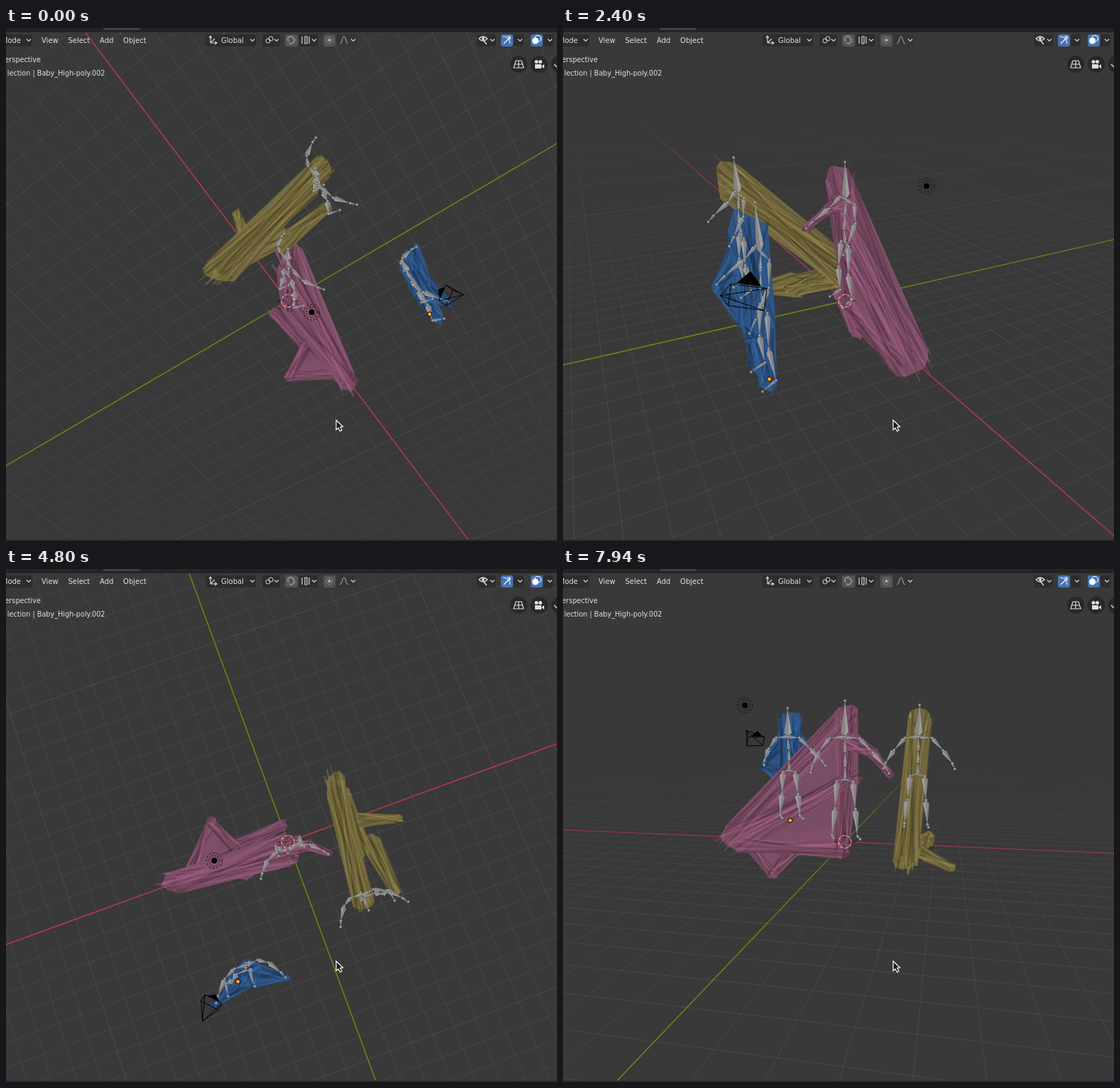
Animation, 776 px wide and 722 px high, one loop 8000 ms. Source, as an HTML page with a canvas:

```html
<!DOCTYPE html>
<html lang="en">
<head>
<meta charset="utf-8">
<title>Viewport orbit</title>
<style>
html, body { margin: 0; width: 100%; height: 100%; overflow: hidden; background: #393939; }
canvas { display: block; }
</style>
</head>
<body>
<canvas id="stage" width="776" height="722"></canvas>
<script>
const ctx = document.getElementById('stage').getContext('2d');
const CX = 397, CY = 384, FOCAL = 690, DIST = 22, NEAR = 0.8, RAD = Math.PI / 180;
const clamp = (v, a = 0, b = 1) => Math.max(a, Math.min(b, v));
const mix = (a, b, k) => a.map((v, i) => v + (b[i] - v) * k);
const add = (a, b, k = 1) => a.map((v, i) => v + b[i] * k);

let seed = 7;
const rand = () => (seed = (seed * 16807) % 2147483647) / 2147483647;

// Orbit keys: time, yaw, pitch (degrees), joined by smooth curves
const orbit = [
  [0, -56.4, -61.6], [1200, -66.5, 29.7], [1800, -2.9, 43], [3150, 133.5, -5.2],
  [4800, 200.1, -96], [6000, 254.5, 10.9], [7940, 191.4, 12.2]
];
function pose(t) {
  let i = 0;
  while (i < orbit.length - 2 && t >= orbit[i + 1][0]) i++;
  const a = orbit[i], b = orbit[i + 1], span = b[0] - a[0], u = clamp((t - a[0]) / span);
  const slope = (k, c) => {
    const p = orbit[Math.max(k - 1, 0)], n = orbit[Math.min(k + 1, orbit.length - 1)];
    return (n[c] - p[c]) / (n[0] - p[0]) * span;
  };
  return [1, 2].map(c => {
    const d = b[c] - a[c], m = slope(i, c), n = slope(i + 1, c);
    return (a[c] + u * (m + u * (3 * d - 2 * m - n + u * (m + n - 2 * d)))) * RAD;
  });
}

let sa, ca, sp, cp;
function setView([yaw, pitch]) {
  sa = Math.sin(yaw); ca = Math.cos(yaw); sp = Math.sin(pitch); cp = Math.cos(pitch);
}
function toView([x, y, z]) {
  const h = y * ca - x * sa;
  return [x * ca + y * sa, h * sp + z * cp, DIST + h * cp - z * sp];
}
const toScreen = ([x, y, d]) => [CX + FOCAL * x / d, CY - FOCAL * y / d];
const project = p => toScreen(toView(p));

function path(points, close) {
  ctx.beginPath();
  points.forEach(p => ctx.lineTo(p[0], p[1]));
  if (close) ctx.closePath();
}
function line(points, color, width = 1) {
  path(points);
  ctx.strokeStyle = color; ctx.lineWidth = width; ctx.stroke();
}
function poly(points, color) {
  path(points, true);
  ctx.fillStyle = color; ctx.fill();
}
function disc(x, y, r, color) {
  ctx.beginPath(); ctx.arc(x, y, r, 0, 7);
  ctx.fillStyle = color; ctx.fill();
}
function ring(x, y, r, color, width = 1, dash = []) {
  ctx.beginPath(); ctx.arc(x, y, r, 0, 7);
  ctx.strokeStyle = color; ctx.lineWidth = width;
  ctx.setLineDash(dash); ctx.stroke(); ctx.setLineDash([]);
}

// Floor grid, fading with distance and at flat angles
function floorLine(at, alongX, range, rgb, strength, reach, width = 1) {
  const point = s => toView(alongX ? [s, at, 0] : [at, s, 0]);
  for (let s = -range; s < range; s += 5) {
    let a = point(s), b = point(s + 5);
    if (a[2] < NEAR && b[2] < NEAR) continue;
    if (a[2] < NEAR) a = mix(b, a, (b[2] - NEAR) / (b[2] - a[2]));
    if (b[2] < NEAR) b = mix(a, b, (a[2] - NEAR) / (a[2] - b[2]));
    const d = Math.hypot(...mix(a, b, 0.5));
    const tilt = clamp(Math.abs(DIST * sp) / d);
    const alpha = strength * (1 - (1 - tilt) ** 4) * clamp((reach - d) / reach * 1.8);
    if (alpha > 0.004) line([toScreen(a), toScreen(b)], `rgba(${rgb},${alpha})`, width);
  }
}
function drawFloor() {
  const flat = Math.abs(sp);
  const minor = 0.08 * clamp((flat - 0.09) * 10), axis = 1.1 * clamp((flat - 0.09) * 10);
  for (const alongX of [true, false]) {
    if (minor) for (let i = -30; i <= 30; i++) if (i % 10) floorLine(i, alongX, 30, '255,255,255', minor, 46);
    for (let i = -100; i <= 100; i += 10) if (i) floorLine(i, alongX, 100, '255,255,255', 0.09, 90);
  }
  if (axis) {
    floorLine(0, true, 100, '188,56,80', axis, 100, 1.4);
    floorLine(0, false, 100, '100,146,10', axis, 100, 1.4);
  }
}

// Bones of one figure, standing at its own origin
const bones = [];
{
  const pelvis = [0, 0, 2.8], neck = [0, 0.05, 4.6];
  const chain = (...joints) => joints.slice(1).forEach((p, i) => bones.push([joints[i], p]));
  chain(pelvis, [0, -0.05, 3.4], [0, 0, 4], neck, [0, 0, 6.1]);
  for (const s of [-1, 1]) {
    chain(neck, [s * 0.65, 0.1, 4.55], [s * 1.2, -0.15, 3.95], [s * 1.68, -0.75, 3.3], [s * 1.82, -1, 3]);
    chain(pelvis, [s * 0.36, 0, 2.7], [s * 0.46, -0.08, 1.5], [s * 0.58, 0.05, 0.3], [s * 0.62, -0.45, 0.05]);
  }
}
function drawBones(base) {
  for (const [from, to] of bones) {
    const a = project(add(base, from)), b = project(add(base, to));
    const dx = b[0] - a[0], dy = b[1] - a[1], len = Math.hypot(dx, dy) || 1;
    const size = Math.hypot(...add(to, from, -1)) * 3.5;
    const mid = [a[0] + dx * 0.14, a[1] + dy * 0.14];
    const side = k => [mid[0] - dy / len * size * k, mid[1] + dx / len * size * k];
    poly([a, side(1), b, mid], '#9c9c9c');
    poly([a, side(-1), b, mid], '#868686');
    for (const p of [a, b]) { disc(...p, 2, '#5d5d5d'); disc(...p, 1.4, '#a5a5a5'); }
  }
}

// Skins: hulls spanned by balls [x, y, z, radius]; streaks run from ball to ball
const DOTS = 24;
function hull(base, ...balls) {
  const points = balls.map(([x, y, z, r]) => Array.from({ length: DOTS }, () => {
    const up = rand() * 2 - 1, turn = rand() * 6.283, flat = Math.sqrt(1 - up * up), k = r * (0.85 + rand() * 0.3);
    return add(add(base, [x, y, z]), [Math.cos(turn) * flat, Math.sin(turn) * flat, up], k);
  }));
  const pick = n => points[n % balls.length][Math.floor(rand() * DOTS)];
  const streaks = Array.from({ length: 45 * balls.length }, (_, n) => {
    const from = pick(n), to = pick(n + 1);
    return { from, to: mix(from, to, 0.97 + rand() * 0.09), width: 0.8 + rand() * 3,
      tone: rand() < 0.55 ? 0.6 : 1.28, alpha: 0.1 + rand() * 0.3 };
  });
  return { points: points.flat(), streaks };
}

// A body lying on the floor whose head is pulled up to the standing bones
function pulledBody(base, turn, veiled) {
  const c = Math.cos(turn), s = Math.sin(turn);
  const at = (along, side, z, r) => [along * c - side * s, along * s + side * c, z, r];
  const head = [0, -0.3, 5.5, 0.55], chest = [0, -0.35, 4.8, 0.45];
  const end = at(5.5, 0.1, 0.1, 0.45), under = at(5, -0.25, -0.4, 0.42);
  const hand = at(2.8, 1.8, -1.15, 0.2), feet = [-1, 1].map(k => at(0, 0.2 + k * 0.55, 0.05 - k * 0.35, 0.24));
  const parts = feet.map((foot, i) => hull(base, at(2.4, i - 0.5, -0.15, 0.4), foot));
  parts.push(hull(base, at(2.3, 0, -0.2, 0.5), at(4.6, 0, -0.2, 0.55)));
  parts.push(hull(base, at(3.4, 0.5, -0.4, 0.3), hand));
  if (veiled) {
    const elbow = [-1.2, -0.2, 3.9, 0.24];
    parts.push(hull(base, at(4.5, 0.2, -0.3, 0.3), hand, at(2.2, 0.3, -0.3, 0.3)));
    parts.push(hull(base, head, end, [-0.2, 0, 2.8, 0.4], under, [0.1, 0.1, -0.3, 0.3]));
    parts.push(hull(base, [-0.3, 0, 4.4, 0.4], elbow), hull(base, elbow, [-1.9, -1, 2.95, 0.16]));
  } else parts.push(hull(base, head, end, chest, under));
  return parts;
}
function cloakedBody(base) {
  const waist = [0, -0.2, 2.4, 0.6], head = [0, -0.35, 5.4, 0.62], parts = [];
  for (const s of [-1, 1]) {
    parts.push(hull(base, [s * 0.25, -0.2, 2.4, 0.5], [s * 0.54, -0.15, 0.3, 0.32]));
    parts.push(hull(base, [0, -0.25, 4.9, 0.5], [s * 1.9, -1, 2.9, 0.16], waist));
  }
  return [...parts, hull(base, head, waist)];
}
const figure = (base, rgb, build, ...args) => ({ base, rgb, parts: build(base, ...args) });
const figures = [
  figure([0, 0, 0], [128, 79, 105], pulledBody, 0, true),
  figure([-2.94, -3.64, 0], [121, 110, 65], pulledBody, Math.PI / 2, false),
  figure([4.15, -5, 0], [47, 87, 136], cloakedBody)
];
function outline(points) {
  points.sort((a, b) => a[0] - b[0] || a[1] - b[1]);
  const half = list => {
    const out = [];
    for (const p of list) {
      while (out.length > 1) {
        const [a, b] = out.slice(-2);
        if ((b[0] - a[0]) * (p[1] - a[1]) > (b[1] - a[1]) * (p[0] - a[0])) break;
        out.pop();
      }
      out.push(p);
    }
    return out.slice(0, -1);
  };
  return [...half(points), ...half([...points].reverse())];
}
function drawSkin({ rgb, parts }) {
  for (const { points, streaks } of parts) {
    poly(outline(points.map(project)), `rgba(${rgb},.9)`);
    for (const s of streaks)
      line([project(s.from), project(s.to)], `rgba(${rgb.map(v => v * s.tone)},${s.alpha})`, s.width);
  }
}

// Scene camera and lamp
const lamp = [4.08, 1.01, 5.9], eye = [7.36, -6.93, 4.96];
function drawCamera() {
  const st = Math.sin(63.6 * RAD), ct = Math.cos(63.6 * RAD), sz = Math.sin(46.7 * RAD), cz = Math.cos(46.7 * RAD);
  const center = add(eye, [-st * sz, st * cz, -ct], 1.39);
  const at = (x, y) => project(add(add(center, [cz, sz, 0], x), [-ct * sz, ct * cz, st], y));
  const frame = [at(-0.5, -0.28), at(0.5, -0.28), at(0.5, 0.28), at(-0.5, 0.28)], apex = project(eye);
  line([...frame, frame[0]], '#000');
  frame.forEach(p => line([p, apex], '#000'));
  poly([at(-0.35, 0.31), at(0.35, 0.31), at(0, 0.66)], '#000');
}
function drawLampDrop() {
  const alpha = 0.45 - Math.abs(sp) * 3;
  if (alpha > 0) line([project(lamp), project([lamp[0], lamp[1], 0])], `rgba(0,0,0,${alpha})`);
}
function drawLamp() {
  const [x, y] = project(lamp);
  disc(x, y, 4, '#000');
  ring(x, y, 7.5, '#111', 1, [2, 2]);
  ring(x, y, 11, '#111', 1, [3, 2.5]);
}
function drawPivot() {
  for (const [dx, dy] of [[1, 0], [-1, 0], [0, 1], [0, -1]])
    line([[CX + dx * 5, CY + dy * 5], [CX + dx * 15, CY + dy * 15]], 'rgba(0,0,0,.7)');
  ring(CX, CY, 9, '#d8c8c8', 1.2);
  ring(CX, CY, 9, '#c8304a', 1.2, [3.5, 3.5]);
}

// Interface
function text(str, x, y, size = 10, align = 'left') {
  ctx.font = `${size}px "DejaVu Sans", sans-serif`;
  ctx.textAlign = align; ctx.fillStyle = '#e0e0e0';
  ctx.fillText(str, x, y);
  return ctx.measureText(str).width;
}
function box(x, w, color = '#2d2d2d') {
  ctx.beginPath(); ctx.roundRect(x, 9, w, 17, 3);
  ctx.fillStyle = color; ctx.fill();
}
function icon(d, color = '#d5d5d5', width = 1.2) {
  ctx.strokeStyle = color; ctx.lineWidth = width; ctx.stroke(new Path2D(d));
}
function dropdown(x, right, color) {
  box(x, right - x, color);
  icon(`M${right - 8} 15.5l3 3 3-3`);
}
function drawHeader() {
  ctx.fillStyle = '#242424'; ctx.fillRect(0, 0, 776, 6);
  ctx.fillStyle = '#424242'; ctx.fillRect(137, 0, 51, 3);
  ctx.fillStyle = '#2c2c2c'; ctx.fillRect(0, 720, 776, 2);
  dropdown(-10, 37); dropdown(281, 352); dropdown(361, 386); dropdown(413, 439); dropdown(466, 494, '#353535');
  dropdown(663, 690); dropdown(715, 729); dropdown(757, 771);
  box(393, 18, '#545454'); box(447, 17, '#545454');
  box(697, 17, '#4772b3'); box(739, 17, '#4772b3');
  text('Mode', 21, 21, 10, 'right');
  let x = 50;
  for (const label of ['View', 'Select', 'Add', 'Object']) x += text(label, x, 21) + 13.7;
  text('Global', 303, 21);
  text('erspective', 49, 48, 9.7, 'right');
  text('lection | Baby_High-poly.002', 139.5, 67, 9.7, 'right');
  icon('M288 21V12M286 14l2-3 2 3M288 21h9M294 19l3 2-3 2M288 21l6-6');
  ring(369, 18, 3, '#d5d5d5'); ring(373, 15, 3, '#d5d5d5');
  icon('M398 19l-1-2a4 4 0 0 1 8-2l2 2M399 21a4 4 0 0 0 6-1l2-3', '#8e8e8e', 2);
  icon('M417 12v10M421 12h3v10h-3zM427 12v10');
  disc(455.5, 17, 2, '#b5b5b5'); ring(455.5, 17, 4.5, '#858585');
  icon('M470 22c4 0 3-10 6-10s2 10 6 10', '#999');
  icon('M666 15q6-6 12 0q-6 6-12 0M672 17l5 6', '#ddd', 1.4); disc(672, 15, 2, '#ddd');
  icon('M700 12q9 0 10 10M701 22l9-9M706 12h4v4', '#fff');
  disc(745.5, 18, 4.5, '#fff'); ring(749, 15, 4.5, '#fff', 1.2);
}
function drawNavigation() {
  for (const x of [722, 751, 780]) disc(x, 51, 12, '#282828');
  icon('M718 46h8l3 10h-14zM722 46v10M716 51h12', '#ddd');
  ctx.fillStyle = '#ddd'; ctx.fillRect(745, 51, 9, 6);
  disc(747, 47.5, 2.5, '#ddd'); disc(752.5, 47.5, 2.5, '#ddd');
  poly([[754, 54], [758, 51], [758, 57]], '#ddd');
  icon('M772 51l4 4', '#ddd', 1.5);
}
function drawPointer() {
  const arrow = new Path2D('M465 552v13.5l3-2.5 2.5 4.5 2.5-1.5-2.2-4.5 3.7-.5z');
  ctx.fillStyle = '#1c1c1c'; ctx.fill(arrow);
  ctx.strokeStyle = '#fff'; ctx.lineWidth = 1.2; ctx.stroke(arrow);
}

function draw(t) {
  setView(pose(t));
  ctx.fillStyle = '#393939'; ctx.fillRect(0, 0, 776, 722);
  drawFloor();
  drawLampDrop();
  const depth = f => toView(add(f.base, [0, 0, 1]))[2];
  [...figures].sort((a, b) => depth(b) - depth(a)).forEach(drawSkin);
  figures.forEach(f => drawBones(f.base));
  drawCamera();
  drawLamp();
  const [x, y] = project(figures[2].base);
  disc(x, y, 3.5, '#000'); disc(x, y, 2.6, '#ffa01e');
  drawPivot();
  drawHeader();
  drawNavigation();
  drawPointer();
}

// The view advances in held steps, the last run of them slightly early
let shown = -1;
function tick(now) {
  const t = now % 8000, start = t < 7490 ? 0 : 7490;
  const step = start + Math.floor((t - start) / 150) * 150;
  if (step !== shown) draw(shown = step);
  requestAnimationFrame(tick);
}
requestAnimationFrame(tick);
</script>
</body>
</html>
```
